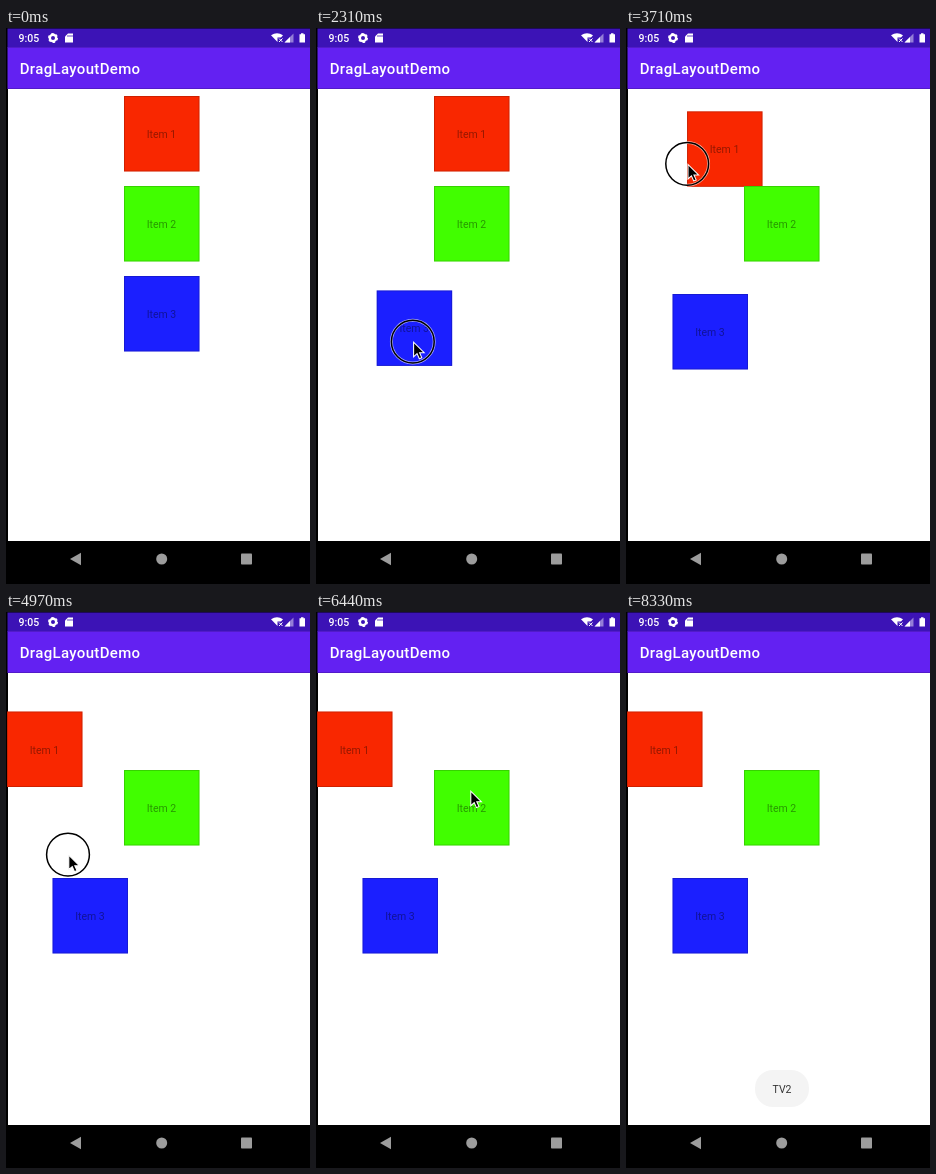
Recreate the animation shown at these times as an HTML page. Size 304 by 556 pixels, loop 8.4 s.

```html
<!DOCTYPE html>
<html lang="en">
<head>
<meta charset="utf-8">
<title>Drag layout demo</title>
<style>
  html, body { margin: 0; width: 100%; height: 100%; overflow: hidden; background: #000; }
  svg { display: block; width: 304px; height: 556px; font-family: Roboto, sans-serif; }
  .item text { font-size: 10.5px; text-anchor: middle; fill: #000; fill-opacity: .4; }
  .edge { fill: none; stroke: #000; stroke-opacity: .17; }
</style>
</head>
<body>
<svg viewBox="0 0 304 556">
  <rect width="304" height="556"/>
  <rect x="1.5" y=".5" width="303" height="19" fill="#3c13b6"/>
  <rect x="1.5" y="19" width="303" height="42" fill="#6321f2"/>
  <rect x="2" y="61" width="302" height="452" fill="#fff"/>
  <path class="edge" d="M2 60.5H304M2 19.5H304"/>

  <g fill="#fff">
    <text x="12.5" y="14" font-size="10.5" font-weight="500">9:05</text>
    <circle cx="47" cy="10" r="3.2" fill="none" stroke="#fff" stroke-width="2.4"/>
    <circle cx="47" cy="10" r="4.4" fill="none" stroke="#fff" stroke-width="1.2" stroke-dasharray="2.4 2.2"/>
    <path d="M62 5.5h5v9h-8v-6z"/>
    <path d="M62 7v2M64 7v2M66 7v2" stroke="#3c13b6" stroke-width=".8"/>
    <path d="M265 7.2Q271 3.2 277 7.2L275 9.5H271.5V14z"/>
    <path d="M273 10.5l3.5 3.5m0-3.5l-3.5 3.5" stroke="#fff"/>
    <path d="M287.5 5.5v9h-9z" opacity=".45"/>
    <path d="M284 9v5.5h-5.5z"/>
    <path d="M293.5 6.2H295v-1h2.5v1H299v8.3h-5.5z"/>
    <text x="13.7" y="46" font-size="15" font-weight="500" letter-spacing=".33">DragLayoutDemo</text>
  </g>

  <g id="items"></g>

  <g id="toast">
    <rect x="129" y="458" width="54" height="37" rx="18" fill="#f4f4f4"/>
    <text x="156" y="481" font-size="10.5" text-anchor="middle" fill="#333">TV2</text>
  </g>

  <g fill="#9c9c9c">
    <path d="M64 531l11-6.3v12.6z"/>
    <circle cx="155.700" cy="531" r="5.500"/>
    <rect x="235" y="525.500" width="11" height="11" rx=".8"/>
  </g>

  <g id="pointer">
    <g id="press" fill="none">
      <circle cy=".6" r="21.4" stroke="#fff" stroke-width="3" stroke-opacity=".6"/>
      <circle cy=".6" r="21.4" stroke="#000" stroke-width="1.5"/>
    </g>
    <path transform="translate(.8 1.2) scale(.88)" fill="#000" stroke="#fff" stroke-width="1.2"
      d="M0 0V16.5L3.900 12.900L6.500 18.700L9.300 17.500L6.800 11.900H12z"/>
  </g>
</svg>
<script>
const LOOP = 8400, STEP = 70;
const $ = id => document.getElementById(id);

// A move eases from the previous resting place: [start ms, end ms, x, y]
const items = [
  { color: "#f92700", moves: [[3430, 4000, 1, 99.5]] },
  { color: "#41fe00", moves: [[4970, 5110, 25, 205], [5390, 5810, 118, 158]] },
  { color: "#1b1fff", moves: [[1960, 2450, 46.5, 266]] }
];
const home = i => [118, 68 + 90 * i];

const pointer = {
  entry: [215, 380], shown: [1120, 8260],
  moves: [
    [1120, 1680, 161, 297], [1960, 2400, 89, 315], [2590, 2870, 169, 154],
    [2870, 3150, 155, 104], [3360, 3850, 38, 143], [4060, 4620, 155, 195],
    [4900, 4970, 62, 242], [5880, 6440, 154, 178]
  ],
  pressed: [[1960, 2520], [3360, 4060], [4620, 5390], [6790, 6930]]
};
const TOAST_IN = 6930, TOAST_FADE = 280;

const within = (t, [from, to]) => t >= from && t < to;
const progress = (t, from, to) => Math.min(1, Math.max(0, (t - from) / (to - from)));
const smooth = v => v * v * (3 - 2 * v);

function place(from, moves, t) {
  return moves.reduce(([x, y], [start, end, toX, toY]) => {
    const k = smooth(progress(t, start, end));
    return [x + (toX - x) * k, y + (toY - y) * k];
  }, from);
}

const moveTo = (node, [x, y]) => node.setAttribute("transform", `translate(${x} ${y})`);
const show = (node, on) => { node.style.display = on ? "" : "none"; };

$("items").innerHTML = items.map(({ color }, i) => `
  <g class="item">
    <rect width="75.5" height="75.5" fill="${color}"/>
    <rect class="edge" x=".5" y=".5" width="74.5" height="74.5"/>
    <text x="37.5" y="42">Item ${i + 1}</text>
  </g>`).join("");
const itemNodes = [...$("items").children];

function draw(t) {
  items.forEach(({ moves }, i) => moveTo(itemNodes[i], place(home(i), moves, t)));
  moveTo($("pointer"), place(pointer.entry, pointer.moves, t));
  show($("pointer"), within(t, pointer.shown));
  show($("press"), pointer.pressed.some(span => within(t, span)));
  $("toast").style.opacity = progress(t, TOAST_IN, TOAST_IN + TOAST_FADE);
}

const start = performance.now();
function tick() {
  const t = (performance.now() - start) % LOOP;
  draw(Math.floor(t / STEP) * STEP);
  requestAnimationFrame(tick);
}
tick();
</script>
</body>
</html>
```
